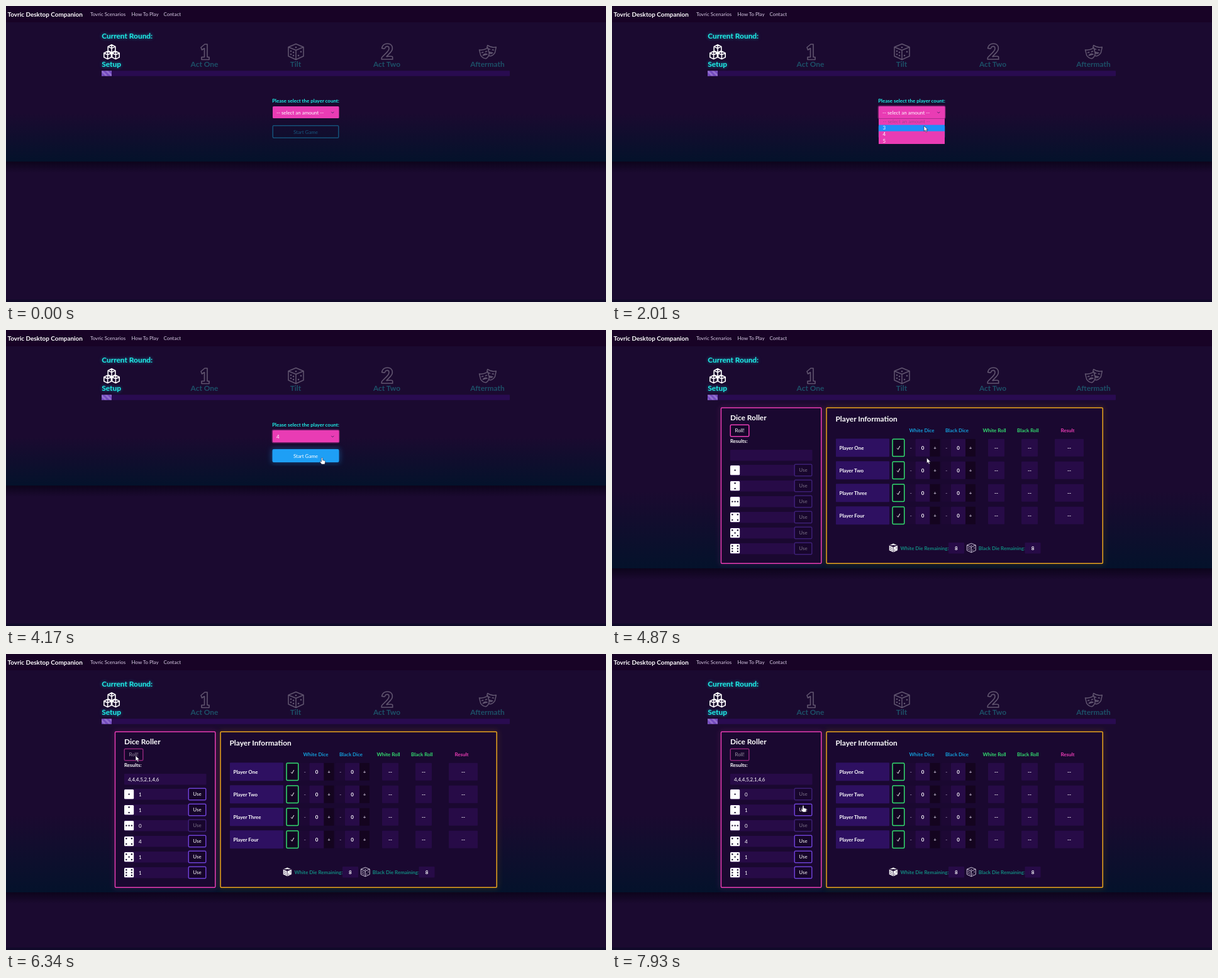
These frames come from a looping animation (954 by 472 pixels, 8000 ms). An HTML page:

```html
<!DOCTYPE html>
<html lang="en">
<head>
<meta charset="utf-8">
<title>Tovric Desktop Companion</title>
<style>
html, body { margin: 0; width: 100%; height: 100%; overflow: hidden; background: #1b0a30; }
svg { display: block; width: 100%; height: 100%; font: 7.95px Lato, sans-serif; }
.b { font-weight: 700; }
.h { font-weight: 700; font-size: 11.92px; }
.glow { filter: drop-shadow(0 0 2.5px #12c8e0a0); }
.m { text-anchor: middle; }
</style>
</head>
<body>
<svg viewBox="0 0 954 472">
  <defs>
    <linearGradient id="panel" x2="0" y2="1">
      <stop offset=".65" stop-color="#1b0a30"/><stop offset="1" stop-color="#04122b"/>
    </linearGradient>
    <linearGradient id="shade" x2="0" y2="1">
      <stop stop-color="#0a0318" stop-opacity=".85"/><stop offset="1" stop-color="#0a0318" stop-opacity="0"/>
    </linearGradient>
    <pattern id="stripes" width="8" height="8" patternUnits="userSpaceOnUse">
      <path d="M0 0H2L8 6V8H6L0 2ZM6 0H8V2Z" fill="#fff" opacity=".17"/>
      <path d="M2 0H6L8 2V6ZM0 2L6 8H2L0 6Z" fill="#4d22b0" opacity=".25"/>
    </pattern>
    <filter id="soft" x="-20%" y="-20%" width="140%" height="140%"><feGaussianBlur stdDeviation="4"/></filter>
  </defs>
  <g id="view"></g>
  <rect id="bar" x="152" y="103.3" width="16" height="8.4" fill="url(#stripes)"/>
  <path id="arrow" d="M0 0V8.6L2 6.9L3.4 10L4.9 9.3L3.6 6.3H6.2Z" fill="#fff" stroke="#160a25" stroke-width=".6"/>
  <path id="hand" d="M-1 .7Q0 -.5 1 .7V4L4.6 5Q5.4 5.4 5.2 6.5L4.3 10.5H-.7L-3.3 6.8Q-3.4 5.5-2.3 5.7L-1 6.7Z" fill="#fff" stroke="#160a25" stroke-width=".5"/>
</svg>
<script>
const LOOP = 8000;
const CYAN = '#1feee6', PINK = '#e93cb4', BLUE = '#1e9ff5', GREEN = '#33dd70', FIELD = '#270b47';
const $ = id => document.getElementById(id);

const text = (x, y, s, fill = '#fff', cls = '') => `<text x="${x}" y="${y}" fill="${fill}" class="${cls}">${s}</text>`;
const box = (x, y, w, h, fill, r = 1, more = '') =>
  `<rect x="${x}" y="${y}" width="${w}" height="${h}" rx="${r}" fill="${fill}" ${more}/>`;
const frame = (x, y, w, h, color, fill = 'none') =>
  box(x + .75, y + .75, w - 1.5, h - 1.5, fill, 1.5, `stroke="${color}" stroke-width="1.5"`);
const at = (x, y, s, more = '') => `<g transform="translate(${x} ${y}) ${more}">${s}</g>`;
const fade = (s, o = .3) => `<g opacity="${o}">${s}</g>`;
const line = (d, color = '#fff', w = 1.6, fill = 'none') =>
  `<path d="${d}" fill="${fill}" stroke="${color}" stroke-width="${w}" stroke-linejoin="round"/>`;
const dot = (x, y, r, fill) => `<circle cx="${x}" cy="${y}" r="${r}" fill="${fill}"/>`;

const cube = (x, y) => at(x, y, line('M0-6.2L5.8-3.4V3.4L0 6.2L-5.8 3.4V-3.4ZL0-.5L5.8-3.4M-5.8-3.4L0-.5V6.2'));

function die(x, y, scale, color, fill, w) {
  const pips = [[0, -7], [-8, -1], [-4, 6], [-8, 4], [-4, 1], [4, 6], [8, 0]];
  return at(x, y, line('M0-12.5L12-7.5V7L0 12.5L-12 7V-7.5ZM-12-7.5L0-2.5L12-7.5M0-2.5V12.5', color, w, fill) +
    pips.map(([a, b]) => dot(a, b, 1.3, color)).join(''), `scale(${scale})`);
}

const mask = (x, y, turn, mouth) => at(x, y,
  line(`M-7-7Q0-4 7-7V2Q5 8 0 9Q-5 8-7 2ZM-4.5-1Q-3-3-1.5-1M1.5-1Q3-3 4.5-1M-3.5 3Q0 ${mouth} 3.5 3Z`, '#fff', 1.5, '#1b0a30'),
  `rotate(${turn})`);

function page(bottom) {
  const step = (x, s) => text(x, 97, s, CYAN, 'h m');
  return box(0, 0, 954, 472, '#1b0a30', 0) +
    box(0, 26, 954, bottom - 26, 'url(#panel)', 0) +
    box(0, bottom, 954, 18, 'url(#shade)', 0) +
    box(0, 468, 954, 4, '#110a2a', 0) +
    box(0, 0, 954, 26, '#180326', 0) +
    `<g font-size="9.94">${text(2.5, 16.5, 'Tovric Desktop Companion', '#fff', 'b')}</g>` +
    text(134, 15.7, 'Tovric Scenarios', '#d9cce6') +
    text(199.5, 15.7, 'How To Play', '#d9cce6') +
    text(250.5, 15.7, 'Contact', '#d9cce6') +
    text(152.3, 52, 'Current Round:', CYAN, 'h glow') +
    cube(168, 68) + cube(161.6, 78.4) + cube(174.4, 78.4) +
    text(152.3, 97, 'Setup', CYAN, 'h glow') +
    fade(step(315.5, 'Act One') + step(460.5, 'Tilt') + step(605.5, 'Act Two') + step(765.5, 'Aftermath') +
      line('M310 66L316 61H320V81.5H323V85.5H311V81.5H315.5V67.5L311.5 70Z') +
      die(461, 73, 1, '#fff', 'none', 1.5) +
      `<text x="606" y="85.3" font-size="34" font-weight="900" class="m" fill="none" stroke="#fff" stroke-width="1.6">2</text>` +
      mask(771, 71, 12, 7) + mask(761, 75, -14, 0)) +
    box(152, 103.3, 649, 8.4, '#290b50', 1) + box(152, 103.3, 16, 8.4, '#7f56c4', 0);
}

function setup({ open, row, count, hover, focus }) {
  let s = text(476.5, 153.5, 'Please select the player count:', CYAN, 'b m');
  if (focus) s += box(422.5, 158.5, 108, 22, PINK, 3, 'opacity=".4"');
  s += box(424, 160, 105.5, 19, PINK, 1.5) +
    text(430, 172.6, count || '-- select an amount --') +
    line('M517.3 168.8L519.3 170.8L521.3 168.8', '#4c2069', 1);
  const glow = count ? box(422, 189, 109, 23, BLUE, 2, 'opacity=".35" filter="url(#soft)"') : '';
  s += glow + frame(423.5, 190, 106, 21, count ? BLUE : '#155078', count && hover ? BLUE : 'none') +
    text(476.5, 203.6, 'Start Game', count ? '#fff' : '#17557c', 'm');
  if (open) {
    s += box(424, 179.5, 105, 40.5, PINK, 0);
    if (row) s += box(424, 179.5 + row * 10.1, 105, 10.1, '#1e8ef8', 0);
    s += ['-- select an amount --', 3, 4, 5]
      .map((v, i) => text(430.5, 187.2 + i * 10.1, v, i ? '#fff' : '#a5418e')).join('');
  }
  return s;
}

const PIPS = ['11', '1012', '011121', '00200222', '0020022211', '000102202122'];
const ROLL = [4, 4, 4, 5, 2, 1, 4, 6];

function roller({ rolled, used, hover }) {
  const button = (x, y, w, label, color, on, hot) =>
    fade(frame(x, y, w, 20, color, on && hot ? color : '#16052a') + text(x + w / 2, y + 12.8, label, '#fff', 'm'), 1)
      .replace('opacity="1"', `opacity="${on ? 1 : label === 'Use' ? .42 : .55}"`);
  let s = text(188, 144, 'Dice Roller', '#fff', 'h') +
    button(187.5, 150.5, 31, 'Roll!', PINK, !rolled, hover === 'roll') +
    text(188, 179.5, 'Results:', '#fff', 'b') +
    box(188, 191, 130.5, 17.5, FIELD);
  if (rolled) s += text(194, 202.6, ROLL.join());
  PIPS.forEach((p, i) => {
    const y = 223.5 + 25 * i;
    const left = ROLL.filter(v => v === i + 1).length - (used && !i);
    s += box(188, y - 8.5, 102, 17.5, FIELD) + box(188, y - 7.5, 15.2, 15.2, '#fff', 1.5);
    for (let k = 0; k < p.length; k += 2) s += dot(191.3 + 4.3 * p[k], y - 4.2 + 4.3 * p[k + 1], 1.2, '#1a1030');
    if (rolled) s += text(211, y + 3, left);
    s += button(289.5, y - 10, 29, 'Use', '#6c40d2', rolled && left > 0, hover === 'use' && !i);
  });
  return s;
}

function players() {
  const heads = [[492.5, 'White Dice', '#139fdc'], [548.5, 'Black Dice', '#139fdc'],
    [608, 'White Roll', GREEN], [661.3, 'Black Roll', GREEN], [724.5, 'Result', PINK]];
  let s = text(355.5, 146, 'Player Information', '#fff', 'h') +
    heads.map(([x, label, c]) => text(x, 162.6, label, c, 'b m')).join('');
  ['One', 'Two', 'Three', 'Four'].forEach((name, i) => {
    const y = 187.8 + 36 * i, mid = (x, v, c = '#fff') => text(x, y + 2.8, v, c, 'b m');
    s += box(356, y - 14.5, 85, 29, '#2e1061') + text(361.5, y + 2.8, 'Player ' + name, '#fff', 'b') +
      frame(445.3, y - 14.5, 20.2, 29, GREEN, '#130522') +
      line(`M453.2 ${y + .6}L454.8 ${y + 2.6}L457.8 ${y - 2.8}`, '#fff', 1);
    for (const x of [467, 523.5])
      s += box(x, y - 14, 15.5, 28, '#1d0834') + box(x + 15.5, y - 14, 23, 28, FIELD) + box(x + 38.5, y - 14, 16, 28, '#14041f') +
        mid(x + 8.2, '-', '#9c8caf') + mid(x + 27, 0) + mid(x + 46.5, '+', '#c9bdd6');
    for (const [x, w] of [[598, 26], [651, 26], [704, 46]])
      s += box(x, y - 14, w, 28, FIELD) + mid(x + w / 2, '--');
  });
  return s + die(447.3, 347.5, .58, '#241038', '#fff', 1.4) + text(458.5, 350.5, 'White Die Remaining:', '#128a80', 'b') +
    box(535, 339, 25, 17.5, FIELD) + text(547.3, 350.5, 8, '#fff', 'b m') +
    die(571.3, 347.5, .58, '#d8d0e2', 'none', 1.6) + text(582.8, 350.5, 'Black Die Remaining:', '#128a80', 'b') +
    box(656.5, 339, 25, 17.5, FIELD) + text(669, 350.5, 8, '#fff', 'b m');
}

function game(state) {
  const panel = (x, w, c) =>
    `<g filter="url(#soft)" opacity=".55">${frame(x, 123.2, w, 249.8, c)}</g>` + frame(x, 123.2, w, 249.8, c, '#1a0830');
  return panel(172.7, 160.8, PINK) + panel(340.3, 440.7, '#eaa51c') + roller(state) + players();
}

// Pointer path: time, x, y
const PATH = [[60, 914, 452], [780, 505, 172], [1250, 500, 171], [1750, 497, 186], [2010, 496, 191], [2250, 494, 193],
  [2450, 482, 204], [2700, 476, 210], [2950, 474, 211], [3330, 470, 206], [3520, 470, 206], [3760, 492, 231], [3880, 494, 230],
  [4100, 502.5, 203.5], [4520, 502.5, 203.5], [5000, 500, 204], [5340, 466, 203], [5640, 278, 168], [6050, 206, 161],
  [6400, 206, 162], [6880, 269, 179], [7250, 304, 222], [7600, 304, 223], [7880, 304, 241.5], [LOOP, 304, 241.5]];

function pointer(t) {
  const i = PATH.findIndex(p => p[0] > t);
  if (i < 1) return null;
  const [t0, x0, y0] = PATH[i - 1], [t1, x1, y1] = PATH[i];
  let k = (t - t0) / (t1 - t0);
  k = k * k * (3 - 2 * k);
  return [x0 + (x1 - x0) * k, y0 + (y1 - y0) * k];
}

let shown;
function draw(now) {
  const t = now % LOOP, p = pointer(t), started = t >= 4520;
  const over = (x, y, w, h) => !!p && p[0] > x && p[0] < x + w && p[1] > y && p[1] < y + h;
  let state, hand;
  if (started) {
    const rolled = t >= 6300, used = t >= 7480;
    const roll = !rolled && over(188, 151, 30, 19), use = rolled && !used && over(290, 214, 28, 19);
    state = { started, rolled, used, hover: roll ? 'roll' : use ? 'use' : '' };
    hand = roll || use || t > 7780;
  } else {
    const open = t >= 1150 && t < 3500, count = t >= 3500 ? 4 : 0;
    const row = open && p[1] > 189.6 ? Math.min(3, Math.floor((p[1] - 179.5) / 10.1)) : 0;
    const hover = !!count && over(424, 190, 106, 21);
    state = { open, row, count, hover, focus: t >= 1150 };
    hand = hover;
  }
  const key = JSON.stringify(state);
  if (key !== shown) {
    shown = key;
    $('view').innerHTML = page(started ? 380 : 248) + (started ? game(state) : setup(state));
  }
  $('stripes').setAttribute('patternTransform', `translate(${-8 * t / 1000} 103.3)`);
  for (const [id, on] of [['arrow', p && !hand], ['hand', p && hand]]) {
    $(id).style.display = on ? '' : 'none';
    if (on) $(id).setAttribute('transform', `translate(${p})`);
  }
  requestAnimationFrame(draw);
}
const begin = performance.now();
requestAnimationFrame(function first(now) { draw(Math.max(0, now - begin)); });
</script>
</body>
</html>
```
